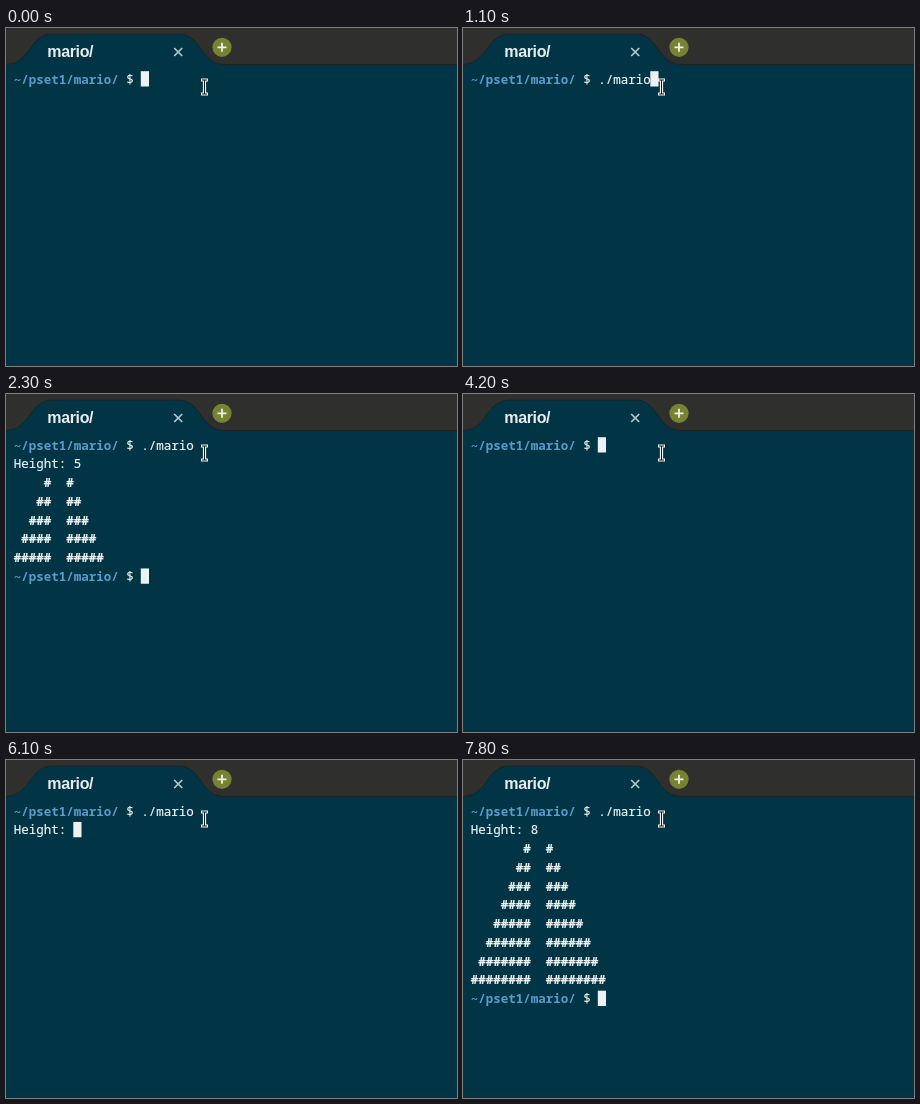
An HTML page for the animation above (8000 ms loop, 451x338 px).

```html
<!DOCTYPE html>
<html lang="en">
<head>
<meta charset="utf-8">
<title>Terminal</title>
<style>
  html, body { margin: 0; width: 100%; height: 100%; overflow: hidden; background: #013545; }
  svg { display: block; width: 451px; height: 338px; }
  .term text { font: 500 12.5px "Noto Sans Mono", "DejaVu Sans Mono", monospace; fill: #eef2f2; stroke: #eef2f2; stroke-width: .2px; white-space: pre; }
  .term .path { font-weight: 700; fill: #5b9ccb; stroke: none; }
  .term .bricks { font-weight: 700; }
  .title { font: 700 16px "Liberation Sans", Arial, sans-serif; letter-spacing: -.35px; fill: #e8eced; }
</style>
</head>
<body>
<svg viewBox="0 0 451 338" xmlns="http://www.w3.org/2000/svg">
  <rect width="451" height="338" fill="#013545"/>
  <rect width="451" height="37" fill="#2f302e"/>
  <path d="M-1 36.5C26 36 22 6 47 6H172C197 6 193 36.5 219 36.5H452V40H-1Z" fill="#013545"/>
  <path d="M-1 36.5C26 36 22 6 47 6H172C197 6 193 36.5 219 36.5H452" fill="none" stroke="#1b2325"/>
  <text class="title" x="41.3" y="28.8">mario/</text>
  <path d="M168.2 20l8 8m0-8l-8 8" stroke="#b9c8cc" stroke-width="1.7" fill="none"/>
  <circle cx="216" cy="19.3" r="9.6" fill="#788233"/>
  <path d="M211.5 19.3h9m-4.5-4.5v9" stroke="#f0f1e4" stroke-width="1.8" fill="none"/>
  <g class="term" id="lines"></g>
  <rect id="caret" width="8.2" height="15.3" fill="#eef1f1"/>
  <g fill="none" transform="translate(-.5 0)">
    <path d="M195.5 52h7M195.5 66h7M199 52v14" stroke="#f4f6f6" stroke-width="3.2"/>
    <path d="M196.5 52h5M196.5 66h5M199 52v14" stroke="#101819"/>
  </g>
</svg>
<script>
const LOOP = 8000, LEFT = 7.8, CELL = 7.5, ROW = 18.75, TOP = 43.2, BASE = 55.6;
const PATH = "~/pset1/mario/", PROMPT = PATH + " $ ", RUN = PROMPT + "./mario";

const pyramid = h => Array.from({ length: h }, (_, i) => {
  const bricks = "#".repeat(i + 1);
  return " ".repeat(h - i - 1) + bricks + "  " + bricks;
});
const result = (h, last) => [RUN, "Height: " + h, ...pyramid(h), last];

// Each step: start time and the lines on screen; the caret follows the last line.
const steps = [
  [0, [PROMPT]],
  [100, [PROMPT + "."]],
  [200, [PROMPT + "./"]],
  [800, [PROMPT + "./m"]],
  [900, [PROMPT + "./ma"]],
  [1000, [PROMPT + "./mari"]],
  [1100, [RUN]],
  [1500, [RUN, "Height: "]],
  [2200, [RUN, "Height: 5"]],
  [2300, result(5, PROMPT)],
  [4200, [PROMPT]],
  [5400, [RUN]],
  [6100, [RUN, "Height: "]],
  [7300, [RUN, "Height: 8"]],
  [7500, result(8, "")],
  [7800, result(8, PROMPT)]
];

const box = document.getElementById("lines");
const caret = document.getElementById("caret");
let shown = null;

function markup(line, i) {
  const body = line.startsWith(PATH)
    ? `<tspan class="path">${PATH}</tspan>${line.slice(PATH.length)}`
    : line;
  const kind = line.includes("#") ? "bricks" : "plain";
  return `<text class="${kind}" x="${LEFT}" y="${BASE + i * ROW}" xml:space="preserve">${body}</text>`;
}

function draw(time) {
  const t = time % LOOP;
  const lines = steps.findLast(s => s[0] <= t)[1];
  if (lines === shown) return;
  shown = lines;
  box.innerHTML = lines.map(markup).join("");
  const row = lines.length - 1;
  caret.setAttribute("x", LEFT - 0.5 + lines[row].length * CELL);
  caret.setAttribute("y", TOP + row * ROW);
}

const start = performance.now();
function tick() {
  draw(performance.now() - start);
  requestAnimationFrame(tick);
}
tick();
</script>
</body>
</html>
```
